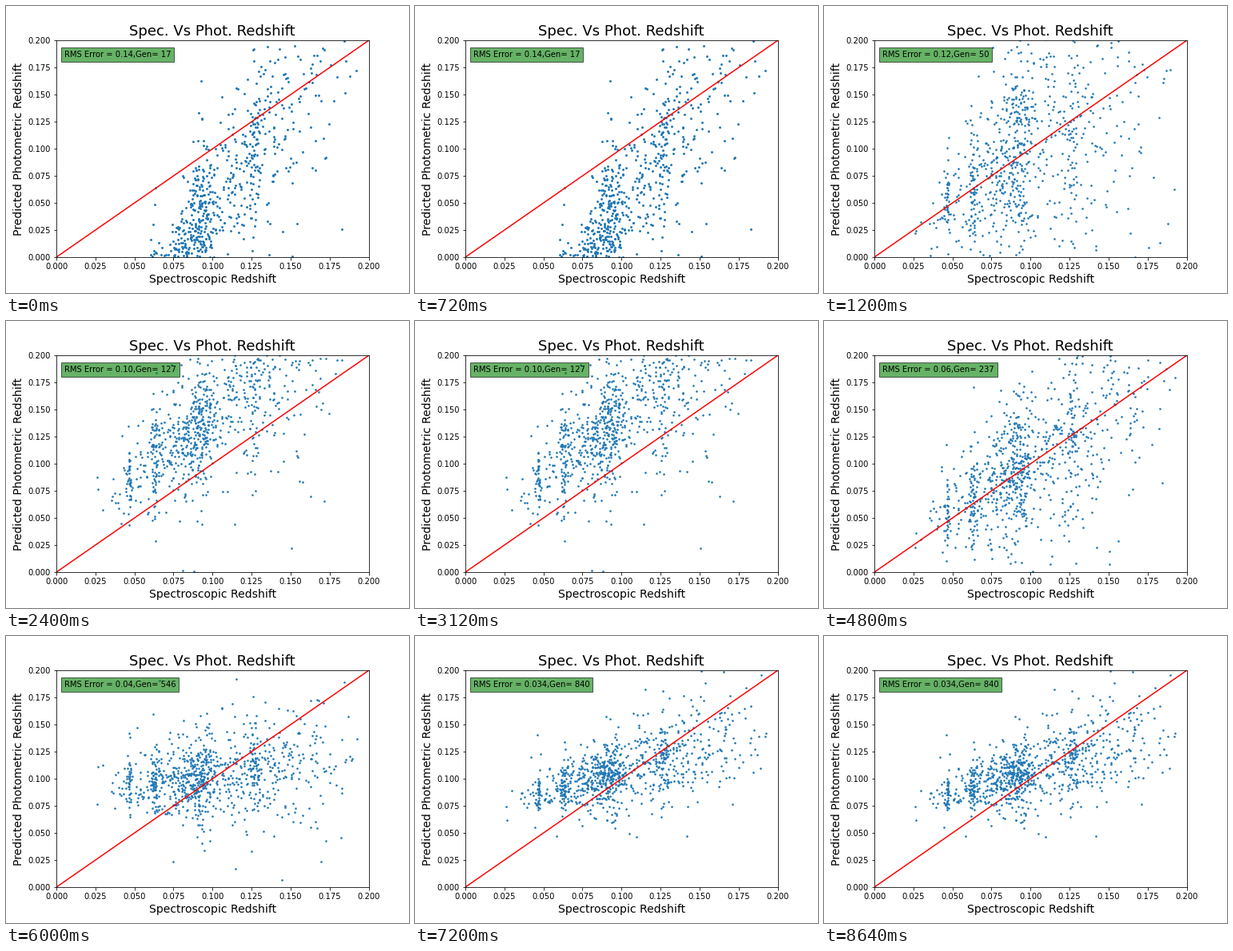
These frames come from a looping animation (504x360 px, 9600 ms). A matplotlib script:

```python
import matplotlib.pyplot as plt
import numpy as np
from matplotlib.animation import FuncAnimation

plt.rcParams["font.family"] = "DejaVu Sans"

LIMIT = 0.2
PIVOT = 0.1

# Galaxy groups on top of the broad field: redshift, spread, count
GROUPS = [(0.0465, 0.001, 38), (0.063, 0.0013, 62), (0.081, 0.006, 95),
          (0.0935, 0.0045, 150), (0.1265, 0.003, 65)]

# RMS error, generation, then the fit at the pivot: level, slope, spread, fan
STAGES = [
    ("0.14", 17, 0.045, 2.0, 0.038, 0.40),
    ("0.12", 50, 0.105, 1.1, 0.065, 0.80),
    ("0.10", 127, 0.145, 1.1, 0.036, 0.35),
    ("0.08", 193, 0.102, 0.85, 0.043, 0.30),
    ("0.06", 237, 0.105, 1.0, 0.038, 0.25),
    ("0.04", 546, 0.103, 0.15, 0.021, 0.17),
    ("0.034", 840, 0.107, 0.4, 0.018, 0.13),
]

rng = np.random.default_rng(17)
field = 0.02 + 0.18 * rng.beta(2.4, 2.4, 520)
spec = np.concatenate(
    [field] + [rng.normal(mid, spread, n) for mid, spread, n in GROUPS])


def predict(level, slope, spread, fan):
    """Straight-line fit whose heavy-tailed scatter widens with redshift."""
    offset = spec - PIVOT
    noise = 0.85 * rng.standard_t(5, spec.size)
    phot = level + slope * offset + (spread + fan * offset) * noise
    return np.column_stack([spec, phot])


clouds = [predict(*fit) for _, _, *fit in STAGES]

fig, ax = plt.subplots(figsize=(7, 5), dpi=72)
fig.subplots_adjust(left=0.125, right=0.9, bottom=0.125, top=0.88)
ticks = np.linspace(0, LIMIT, 9)
ax.set(xlim=(0, LIMIT), ylim=(0, LIMIT), xticks=ticks, yticks=ticks)
ax.set_title("Spec. Vs Phot. Redshift", fontsize=18)
ax.set_xlabel("Spectroscopic Redshift", fontsize=14)
ax.set_ylabel("Predicted Photometric Redshift", fontsize=14)

dots = ax.scatter([], [], color="C0")
ax.plot([0, LIMIT], [0, LIMIT], color="red", lw=1.5)
note = ax.text(0.005, 0.185, "", fontsize=10,
               bbox=dict(facecolor="green", alpha=0.6))


def update(step):
    # The last stage holds for two steps
    stage = min(step, len(STAGES) - 1)
    error, gen = STAGES[stage][:2]
    dots.set_offsets(clouds[stage])
    dots.set_sizes([3.5 if stage == 0 else 2.5])
    note.set_text(f"RMS Error = {error},Gen= {gen}")
    return dots, note


anim = FuncAnimation(fig, update, frames=len(STAGES) + 1, interval=1200,
                     repeat=True, repeat_delay=0, blit=False)
plt.show()
```
